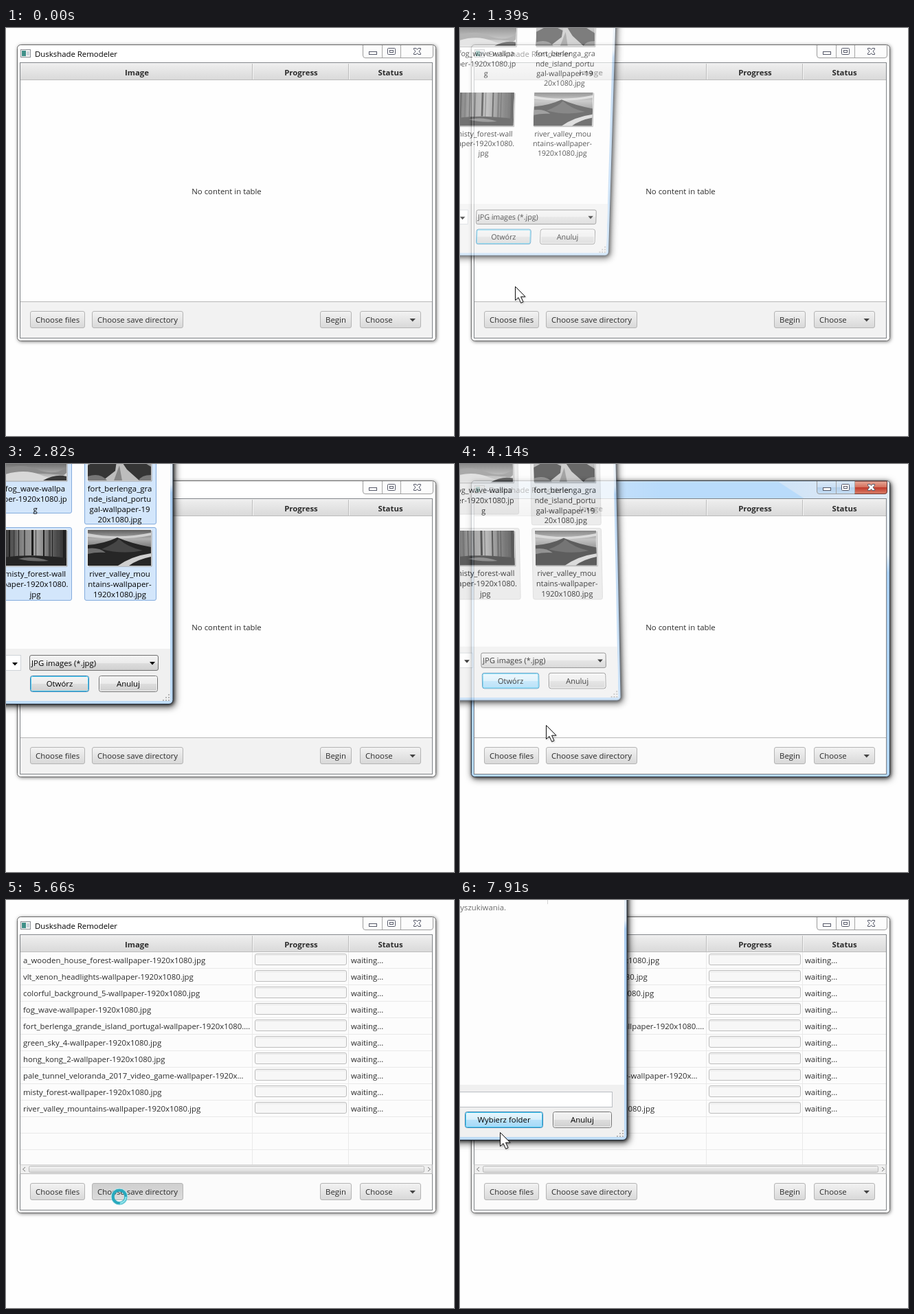
An HTML page that plays this animation: 652 by 594 pixels, repeating every 8 s.

```html
<!DOCTYPE html>
<html lang="en">
<head>
<meta charset="utf-8">
<title>Image batch window</title>
<style>
  html, body { margin: 0; width: 100%; height: 100%; overflow: hidden; background: #fefefe; }
  svg { display: block; width: 652px; height: 594px; font: 11.4px "Open Sans", "Noto Sans", sans-serif; fill: #2b2b2b; }
  .bold { font-weight: 700; }
  .mid { text-anchor: middle; }
  .end { text-anchor: end; }
  .frame { filter: drop-shadow(1px 1px 2.5px rgba(0,0,0,.5)); }
  .active .frame { filter: drop-shadow(1px 1px 2px rgba(0,0,0,.55)) drop-shadow(1px 2px 5px rgba(0,0,0,.65)); }
  .glass { filter: drop-shadow(1px 1px 2px rgba(0,0,0,.6)) drop-shadow(2px 3px 5px rgba(0,0,0,.7)); }
  .cursor { filter: drop-shadow(1px 1px 1px rgba(0,0,0,.2)); }
  .band { mix-blend-mode: multiply; }
  .cell { fill: none; stroke: none; }
  .cell.on { fill: #d3e6fb; stroke: #84acdd; }
  .cell.dim { fill: #e6e6e6; stroke: #d6d6d6; }
</style>
</head>
<body>
<svg id="stage" viewBox="0 0 652 594" xmlns="http://www.w3.org/2000/svg"></svg>
<script>
const LOOP = 8000;
const stage = document.getElementById('stage');

const text = (x, y, s, cls = '', extra = '') => `<text x="${x}" y="${y}" class="${cls}" ${extra}>${s}</text>`;
const rect = (x, y, w, h, fill, extra = '') =>
  `<rect x="${x}" y="${y}" width="${w}" height="${h}" fill="${fill}" ${extra}/>`;
const path = (d, fill, extra = '') => `<path d="${d}" fill="${fill}" ${extra}/>`;
const stroke = (color, width = 1) => `stroke="${color}" stroke-width="${width}"`;
const group = (id, content, extra = '') => `<g id="${id}" ${extra}>${content}</g>`;
const gradient = (id, stops, across = 0) =>
  `<linearGradient id="${id}" x1="0" y1="0" x2="${across}" y2="${across ? 0 : 1}">` +
  stops.map(([o, c]) => `<stop offset="${o}" stop-color="${c}"/>`).join('') + '</linearGradient>';

const defs = '<defs>' +
  gradient('head', [[0, '#efefef'], [1, '#d9d9d9']]) +
  gradient('btn', [[0, '#f3f3f3'], [1, '#d8d8d8']]) +
  gradient('btnHover', [[0, '#fafafa'], [1, '#e4e4e4']]) +
  gradient('btnDown', [[0, '#cfcfcf'], [1, '#dcdcdc']]) +
  gradient('aero', [[0, '#f3f3f3'], [.5, '#ebebeb'], [.51, '#dddddd'], [1, '#cfcfcf']]) +
  gradient('aeroHot', [[0, '#eaf6fd'], [.5, '#d5effc'], [.51, '#b8e2fa'], [1, '#a3d8f7']]) +
  gradient('red', [[0, '#e8a999'], [.48, '#d5705c'], [.5, '#c0392b'], [1, '#d9806a']]) +
  gradient('blue', [[0, '#d9e8f7'], [.5, '#c9def4'], [.51, '#b3cfea'], [1, '#c6def5']]) +
  gradient('caption', [[0, '#e3edf8'], [.45, '#b9dbfb'], [1, '#b9dbfb']], 1) +
  gradient('shine', [[0, '#cfe3f7'], [1, '#e3ecf6']], 1) +
  gradient('side', [[0, '#eef3f8'], [.25, '#e4edf6'], [.31, '#a9cff5'], [1, '#b5d8f8']]) +
  gradient('dlgGlass', [[0, '#eaf1f8'], [.22, '#e2ecf6'], [.25, '#a8cbef'], [1, '#bfdcf7']]) +
  gradient('sky', [[0, '#5c5c5c'], [.45, '#b4b4b4'], [1, '#2c2c2c']]) +
  gradient('fog', [[0, '#2c2c2c'], [.5, '#6a6a6a'], [1, '#d8d8d8']]) +
  gradient('mist', [[0, '#2e2e2e'], [.3, '#858585'], [.55, '#a2a2a2'], [.85, '#4a4a4a'], [1, '#2c2c2c']], 1) +
  gradient('ground', [[0, '#202020'], [.3, '#202020'], [1, '#202020']]) +
  gradient('haze', [[0, '#5e5e5e'], [.25, '#b0b0b0'], [.55, '#6a6a6a'], [1, '#202020']]) +
  '<clipPath id="names"><rect x="22" y="76" width="335" height="310"/></clipPath>' +
  '<clipPath id="thumb"><rect width="92" height="52"/></clipPath></defs>';

const button = (id, x, w, label, tx) =>
  rect(x + .5, 412.5, w - 1, 24, 'url(#btn)', `id="${id}" rx="2.5" ${stroke('#b4b4b4')}`) + text(tx, 429, label);

function controls() {
  const shape = 'M519.5 25V40q0 3.5 3.5 3.5H618q3.5 0 3.5-3.5V25';
  const cross = 'M593.5 29.5H597L598.5 31.5L600 29.5H603.5V31L601 34L603.5 37V38.5H600L598.5 36.5L597 38.5H593.5V37L596 34L593.5 31Z';
  return path(shape, '#fcfcfc', `id="ctrl" ${stroke('#9b9b9b')}`) +
    path('M574.5 25V43.5H618q3.5 0 3.5-3.5V25Z', 'url(#red)', `id="close" ${stroke('#6f3a36')}`) +
    path('M547.5 25V43M574.5 25V43', 'none', stroke('#a5a5a5')) +
    rect(528.5, 34.5, 11, 4, '#fff', stroke('#555868')) +
    rect(555.5, 29.5, 11, 9, '#fff', `rx="1" ${stroke('#555868')}`) +
    rect(558.5, 32.5, 5, 3, '#fff', stroke('#555868')) +
    path(cross, '#fff', stroke('#555868'));
}

const files = ['a_wooden_house_forest-wallpaper-1920x1080.jpg', 'vlt_xenon_headlights-wallpaper-1920x1080.jpg',
  'colorful_background_5-wallpaper-1920x1080.jpg', 'fog_wave-wallpaper-1920x1080.jpg',
  'fort_berlenga_grande_island_portugal-wallpaper-1920x1080....', 'green_sky_4-wallpaper-1920x1080.jpg',
  'hong_kong_2-wallpaper-1920x1080.jpg', 'pale_tunnel_veloranda_2017_video_game-wallpaper-1920x...',
  'misty_forest-wallpaper-1920x1080.jpg', 'river_valley_mountains-wallpaper-1920x1080.jpg'];

function tableRows() {
  let grid = 'M358.5 76V385M498.5 76V385';
  for (let i = 0; i < 12; i++) grid += `M21 ${99.5 + 24 * i}H620`;
  const rows = files.map((name, i) => {
    const y = 24 * i;
    return text(25, 92 + y, name, '', 'clip-path="url(#names)"') + text(502, 92 + y, 'waiting...') +
      rect(362.5, 78.5 + y, 133, 16, '#f7f7f7', `rx="2.5" ${stroke('#bdbdbd')}`) +
      path(`M364 ${80.5 + y}H494`, 'none', stroke('#e6e6e6'));
  }).join('');
  return rect(21, 76, 599, 322, '#fcfcfc') + path(grid, 'none', stroke('#e9e9e9')) + rows +
    rect(21, 385.5, 599, 13, '#efefef', stroke('#d2d2d2')) +
    rect(33.5, 387.5, 575, 9, 'url(#btn)', `rx="2" ${stroke('#b9b9b9')}`) +
    path('M28 389L24.5 392L28 395M614 389L617.5 392L614 395', 'none', stroke('#777'));
}

function mainWindow() {
  const headers = [[190.5, 'Image'], [429.5, 'Progress'], [559.5, 'Status']];
  const caption = rect(17.5, 25.5, 607, 25, 'url(#caption)', 'rx="4"') + path('M462 25H621q4 0 4 4V51H502Z', 'url(#shine)');
  return rect(16.5, 24.5, 609, 431, '#fff', `id="frame" class="frame" rx="5" ${stroke('#6a6a6a')}`) +
    group('caption', caption) +
    rect(21.5, 31.5, 14, 11, '#f4f4f4', stroke('#8b8f94')) +
    rect(23, 33, 6, 8, '#3f8f88') + rect(30, 34, 4, 6, '#c9d3da') +
    text(42, 42, 'Duskshade Remodeler', '', 'fill="#000"') + controls() +
    rect(20.5, 50.5, 600, 401, '#fefefe', stroke('#7f8387')) +
    rect(21, 399, 599, 52, '#f2f2f2', 'id="bar"') +
    group('empty', text(321, 242, 'No content in table', 'mid')) +
    group('rows', tableRows()) +
    rect(21, 51, 599, 25, 'url(#head)') +
    path('M21 75.5H620M358.5 51V75M498.5 51V75', 'none', stroke('#bcbcbc')) +
    path('M359.5 52V75M499.5 52V75M21 51.5H620', 'none', stroke('#f5f5f5')) +
    headers.map(([x, s]) => text(x, 69, s, 'mid bold')).join('') +
    path('M21 398.5H620', 'none', stroke('#b8b8b8')) +
    button('files', 35, 80, 'Choose files', 43) + button('save', 125, 133, 'Choose save directory', 133) +
    button('begin', 457, 46, 'Begin', 465) + button('combo', 515, 89, 'Choose', 523) +
    path('M587.5 423H596L591.8 427.5Z', '#444');
}

// Flat greyscale landscapes for the thumbnails.
const wave = rect(0, 0, 92, 52, 'url(#fog)') + path('M0 36Q26 26 50 36T92 33V45Q40 38 0 46Z', '#8c8c8c') +
  path('M0 44Q30 34 55 44T92 41V52H0Z', '#d8d8d8') + path('M58 52Q76 42 92 46V52Z', '#3a3a3a');
const fort = rect(0, 0, 92, 52, 'url(#sky)') + path('M0 30L22 18L42 28L66 16L92 32V52H0Z', '#353535') +
  path('M42 24H49L57 36L75 52H22L40 38Z', '#bdbdbd') + path('M46 30L50 52H38Z', '#868686') +
  path('M0 46Q18 40 28 52H0ZM92 44Q78 44 74 52H92Z', '#777');
const trunks = [2, 8, 14, 22, 30, 41, 47, 58, 66, 71, 80, 87];
const forest = rect(0, 0, 92, 52, 'url(#mist)') +
  trunks.map((x, i) => rect(x, 0, 1 + i % 3, 36 + i * 5 % 12, i % 2 ? '#1f1f1f' : '#484848')).join('') +
  path('M0 40Q40 34 92 41V52H0Z', '#252525') + path('M22 42Q42 37 66 45Q40 47 22 42Z', '#6b6b6b');
const river = rect(0, 0, 92, 52, 'url(#haze)') + path('M0 5Q45 14 92 4V8Q50 16 0 10Z', '#d0d0d0') +
  path('M0 22Q24 20 43 11Q64 20 92 25V52H0Z', '#262626') + path('M20 28Q40 20 45 13Q58 25 80 30Q50 36 20 28Z', '#464646') +
  path('M44 52Q64 38 92 34V39Q72 43 60 52Z', '#cfcfcf') + path('M0 27Q16 25 26 33Q12 32 0 35Z', '#6e6e6e');

function fileItem(id, x, y, h, picture, lines) {
  return rect(x - 4.5, y - 3.5, 104, h, 'none', `id="${id}" class="cell" rx="2.5"`) +
    `<g transform="translate(${x} ${y})"><g clip-path="url(#thumb)">${picture}</g>` +
    rect(-.5, -.5, 93, 53, 'none', stroke('#f4f4f4')) + path('M1 53H93V1', 'none', stroke('#9a9a9a')) + '</g>' +
    lines.map((s, i) => text(x + 46.5, y + 68 + 15 * i, s, 'mid', 'fill="#000"')).join('');
}

function aeroButton(id, x, w, label, isDefault) {
  return rect(x + .5, 308.5, w - 1, 23, 'url(#aero)', `id="${id}" rx="3" ${stroke(isDefault ? '#3c7fb1' : '#707070')}`) +
    rect(x + 1.5, 309.5, w - 3, 21, 'none', `rx="2" ${stroke(isDefault ? '#48cdf2' : '#fafafa')}`) +
    text(x + w / 2, 324, label, 'mid', 'fill="#000"');
}

function dialog() {
  let grip = '';
  for (let r = 0; r < 3; r++) for (let c = 0; c <= r; c++) grip += rect(236 - 4 * c, 335 + 4 * r, 2, 2, '#b5b5b5');
  const picker =
    fileItem('c0', -4, -28, 103, wave, ['fog_wave-wallpa', 'per-1920x1080.jp', 'g']) +
    fileItem('c1', 119, -28, 119, fort, ['fort_berlenga_gra', 'nde_island_portu', 'gal-wallpaper-19', '20x1080.jpg']) +
    fileItem('c2', -4, 96, 106, forest, ['misty_forest-wall', 'paper-1920x1080.', 'jpg']) +
    fileItem('c3', 119, 96, 106, river, ['river_valley_mou', 'ntains-wallpaper-', '1920x1080.jpg']) +
    rect(-40.5, 278.5, 62, 22, '#fff', stroke('#cfd3d8')) + path('M9 289H17L13 293.5Z', '#000') +
    rect(34.5, 278.5, 187, 22, 'url(#aero)', `rx="2.5" ${stroke('#707070')}`) +
    text(37, 294, 'JPG images (*.jpg)', '', 'fill="#000"') + path('M209 288H217L213 292.5Z', '#000') +
    aeroButton('open', 35, 86, 'Otwórz', true);
  const folder = group('noMatch', text(67, 15, 'Brak elementów pasujących do kryteriów wyszukiwania.', 'end', 'fill="#6d6d6d"')) +
    path('M127.5 0V6', 'none', stroke('#d5d5d5')) +
    rect(-40.5, 279.5, 262, 22, '#fff', `id="field" ${stroke('#b9bdc2')}`) +
    aeroButton('pick', 7, 114, 'Wybierz folder', true);
  return rect(-300.5, -60.5, 543.5, 410, 'url(#dlgGlass)', `class="glass" rx="6" ${stroke('#222c38')}`) +
    rect(-300, -60, 539, 405, '#fdfdfd') + rect(-300, 269, 539, 76, '#f0f0f0') + grip +
    group('picker', picker) + group('folder', folder) + aeroButton('cancel', 135, 86, 'Anuluj') +
    rect(0, 0, 0, 0, '#a8caee', `id="band" class="band" ${stroke('#3399ff')}`);
}

const arrow = path('M.5 .5V20.5L5 16.4L8.6 24.3L12 22.8L8.5 15.2H15Z', '#fff', stroke('#111'));
const busy = '<circle r="9.5" fill="none" stroke="#2aa9bd" stroke-width="4.5"/>' +
  '<circle r="9.5" fill="none" stroke="#8fe3ea" stroke-width="2.5" stroke-dasharray="14 45.7"/>' +
  '<circle r="12" fill="none" stroke="#b9e9ee" stroke-width="1"/>';

stage.innerHTML = defs + group('main', mainWindow()) + group('dialog', dialog()) +
  group('arrow', arrow, 'class="cursor"') + group('busy', busy);

const el = Object.fromEntries([...stage.querySelectorAll('[id]')].map(n => [n.id, n]));
const show = (id, on) => { el[id].style.display = on ? '' : 'none'; };
const set = (id, attrs) => { for (const k in attrs) el[id].setAttribute(k, attrs[k]); };
const at = (steps, t) => steps.reduce((found, step) => step[0] <= t ? step : found, steps[0]);
const within = (t, a, b) => t >= a && t < b;

// time, tip x, tip y
const pointer = [[0, -40, 400], [370, 1, 414], [475, 40, 398], [580, 74, 415], [1270, 78, 396], [1390, 80, 376],
  [1490, 130, 300], [1610, 182, 236], [1970, 130, 208], [2090, 60, 178], [2210, -7, 146], [2330, -40, 90],
  [2950, -8, 396], [3070, 30, 380], [3190, 62, 337], [3310, 76, 318], [3420, 80, 314], [4140, 125, 380],
  [4280, 142, 402], [4390, 154, 420], [4490, 161, 430], [5660, 165, 432], [6020, -40, 300],
  [7340, -8, 170], [7460, 16, 226], [7570, 36, 272], [7690, 50, 304], [7800, 56, 326], [7910, 58, 338]];
// time, opacity, tilt amount
const fades = [[0, 0, 0], [1270, .25, 1.5], [1390, .64, 1], [1490, .93, .25], [1610, 1, 0],
  [4140, .74, 1], [4280, .28, 2], [4390, 0, 0], [5780, .22, 1.5], [5900, .64, 1], [6020, .93, .25], [6140, 1, 0]];
// time, left, top of the drag selection anchored at 182,236
const bands = [[0, 182, 236], [1850, 165, 226], [1970, 130, 208], [2090, 75, 184], [2210, 18, 150],
  [2330, -20, 110], [2450, -20, 60], [2570, -20, 40], [2690, 182, 236]];
const opening = [.932, 0, -.029, .937, 0, 4], closing = [.97, 0, .02, .976, -8.4, 3.3], flat = [1, 0, 0, 1, 0, 0];

function draw(t) {
  const active = within(t, 790, 1030) || within(t, 4140, 5660);
  const listed = t >= 4490;
  el.main.classList.toggle('active', active);
  set('frame', { fill: active ? 'url(#side)' : '#fff', stroke: active ? '#2d3640' : '#6a6a6a' });
  set('ctrl', { fill: active ? 'url(#blue)' : '#fcfcfc' });
  set('bar', { fill: t >= 4140 ? '#fbfbfb' : '#f2f2f2' });
  show('caption', active);
  show('close', active);
  show('rows', listed);
  show('empty', !listed);
  set('files', { fill: within(t, 790, 910) ? 'url(#btnDown)' : within(t, 580, 1270) ? 'url(#btnHover)' : 'url(#btn)' });
  set('save', { fill: within(t, 5660, 6020) ? 'url(#btnDown)' : within(t, 4490, 5660) ? 'url(#btnHover)' : 'url(#btn)' });

  const [, opacity, tilt] = at(fades, t);
  const target = within(t, 4140, 5000) ? closing : opening;
  const matrix = flat.map((v, i) => v + (target[i] - v) * tilt);
  show('dialog', opacity > 0);
  set('dialog', { opacity, transform: `matrix(${matrix})` });
  show('picker', t < 5000);
  show('folder', t >= 5000);
  show('noMatch', t >= 7220);

  const [, left, top] = at(bands, t);
  show('band', left < 182);
  set('band', { x: left + .5, y: top + .5, width: 181 - left, height: 235 - top });
  const chosen = [2450, 2450, 2090, 1970];
  chosen.forEach((from, i) => {
    set('c' + i, { class: 'cell' + (t < from ? '' : t < 3760 ? ' on' : ' dim') });
  });
  set('open', { fill: within(t, 3310, 5000) ? 'url(#aeroHot)' : 'url(#aero)' });
  set('pick', { fill: t >= 7690 ? 'url(#aeroHot)' : 'url(#aero)' });
  set('field', { stroke: within(t, 6740, 6970) ? '#5b9bd0' : '#b9bdc2' });

  const [, x, y] = at(pointer, t);
  const waiting = within(t, 1030, 1270) || within(t, 5660, 6020);
  show('arrow', !waiting);
  show('busy', waiting);
  set(waiting ? 'busy' : 'arrow', { transform: `translate(${x} ${y})` });
}

const start = performance.now();
function tick() {
  draw((performance.now() - start) % LOOP);
  requestAnimationFrame(tick);
}
draw(0);
requestAnimationFrame(tick);
</script>
</body>
</html>
```
